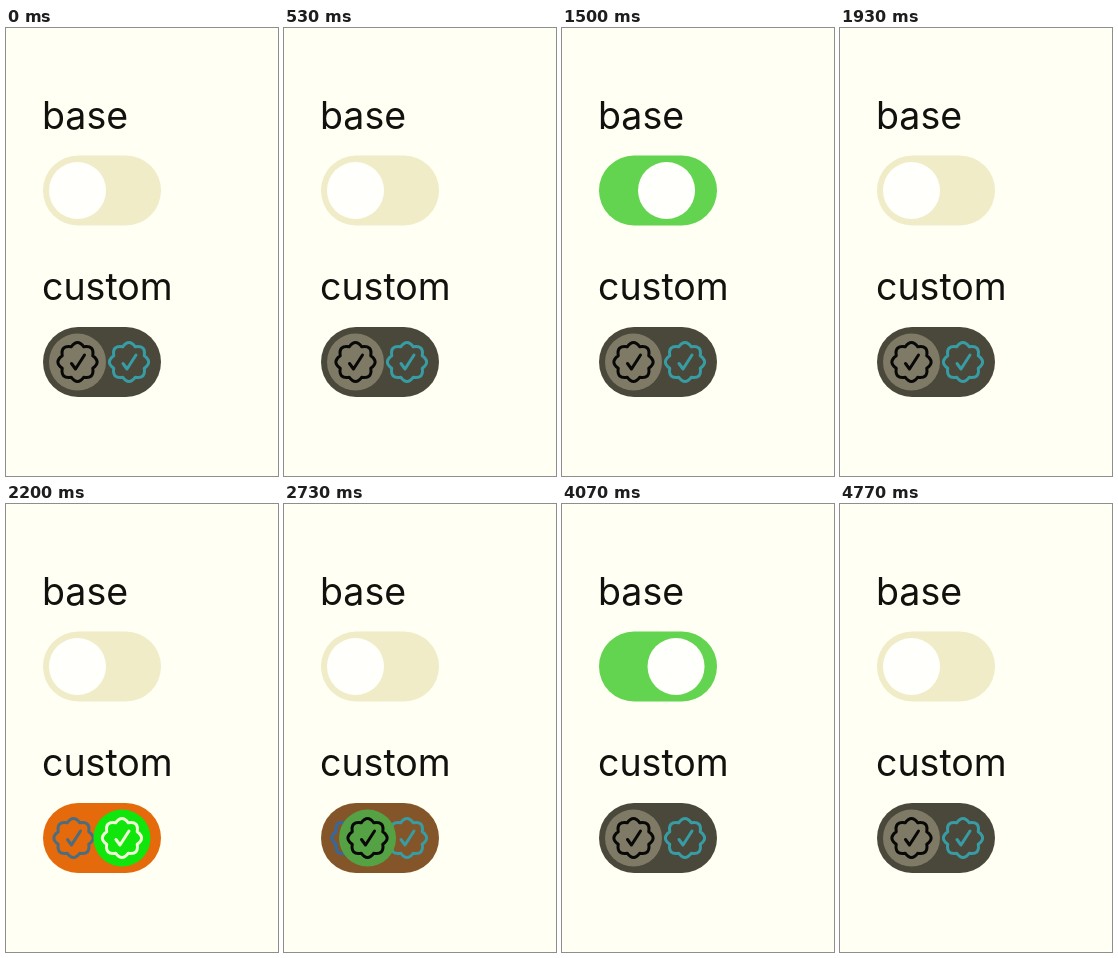
Recreate the animation shown at these times as an HTML page. Size 272 by 448 pixels, loop 4810 ms.

```html
<!DOCTYPE html>
<html lang="en">
<head>
<meta charset="utf-8">
<title>Toggles</title>
<style>
  html, body { margin: 0; width: 100%; height: 100%; overflow: hidden; background: #fffff3; }
  svg { display: block; }
  text { font: 400 37.5px Inter, "Liberation Sans", sans-serif; fill: #11110e; }
  .icon { fill: none; stroke-width: 3; stroke-linecap: round; stroke-linejoin: round; }
</style>
</head>
<body>
<svg width="272" height="448" viewBox="0 0 272 448">
  <defs>
    <g id="badge"><path id="seal"/><path d="M-6 1.5L-2 7L7 -7"/></g>
  </defs>
  <text x="36" y="101">base</text>
  <rect id="baseTrack" x="37" y="127.5" width="118" height="70" rx="35"/>
  <circle id="baseThumb" cy="162.5" r="28.5" fill="#fffffb"/>

  <text x="36" y="272">custom</text>
  <rect id="track" x="37" y="299" width="118" height="70" rx="35"/>
  <use id="left" class="icon" href="#badge" x="67.5" y="334"/>
  <use class="icon" href="#badge" x="123" y="334" stroke="#379ca4"/>
  <g id="thumb">
    <circle id="disc" cy="334" r="28.5"/>
    <use id="mark" class="icon" href="#badge" y="334"/>
  </g>
</svg>
<script>
const LOOP = 4810, SLIDE = 300;
const OFF_X = 71.5, TRAVEL = 49;
// [switch on, switch off] start times in ms
const BASE = [[760, 1385], [3397, 4000]];
const CUSTOM = [[1960, 2530]];

const $ = id => document.getElementById(id);
const clamp = v => Math.min(1, Math.max(0, v));
const ease = v => (1 - Math.cos(Math.PI * clamp(v))) / 2;

const position = (spans, t) => spans.reduce(
  (sum, [on, off]) => sum + ease((t - on) / SLIDE) - ease((t - off) / SLIDE), 0);

const mix = (a, b, k) =>
  `rgb(${a.map((v, i) => Math.round(v + (b[i] - v) * k)).join()})`;

function sealPath(lobes, inner, control) {
  const at = (r, step) => {
    const a = step * 2 * Math.PI / lobes - Math.PI / 2;
    return `${(r * Math.cos(a)).toFixed(2)} ${(r * Math.sin(a)).toFixed(2)}`;
  };
  let d = `M${at(inner, -0.5)}`;
  for (let i = 0; i < lobes; i++) d += `Q${at(control, i)} ${at(inner, i + 0.5)}`;
  return d + 'Z';
}

function draw(t) {
  const base = position(BASE, t);
  $('baseThumb').setAttribute('cx', OFF_X + TRAVEL * base);
  $('baseTrack').setAttribute('fill', mix([240, 236, 200], [98, 212, 80], clamp(base * 1.5)));

  const p = position(CUSTOM, t), tint = clamp(p * 1.5);
  $('thumb').setAttribute('transform', `translate(${OFF_X + TRAVEL * p} 0)`);
  $('track').setAttribute('fill', mix([74, 72, 58], [228, 106, 12], tint));
  $('disc').setAttribute('fill', mix([126, 122, 102], [16, 230, 12], tint));
  $('left').setAttribute('stroke', mix([38, 102, 184], [76, 108, 128], tint));
  $('mark').setAttribute('stroke', mix([8, 8, 6], [240, 255, 214], clamp(p * 2 - 0.5)));
}

$('seal').setAttribute('d', sealPath(8, 16.5, 24));

const start = performance.now();
function tick() {
  draw((performance.now() - start) % LOOP);
  requestAnimationFrame(tick);
}
tick();
</script>
</body>
</html>
```
